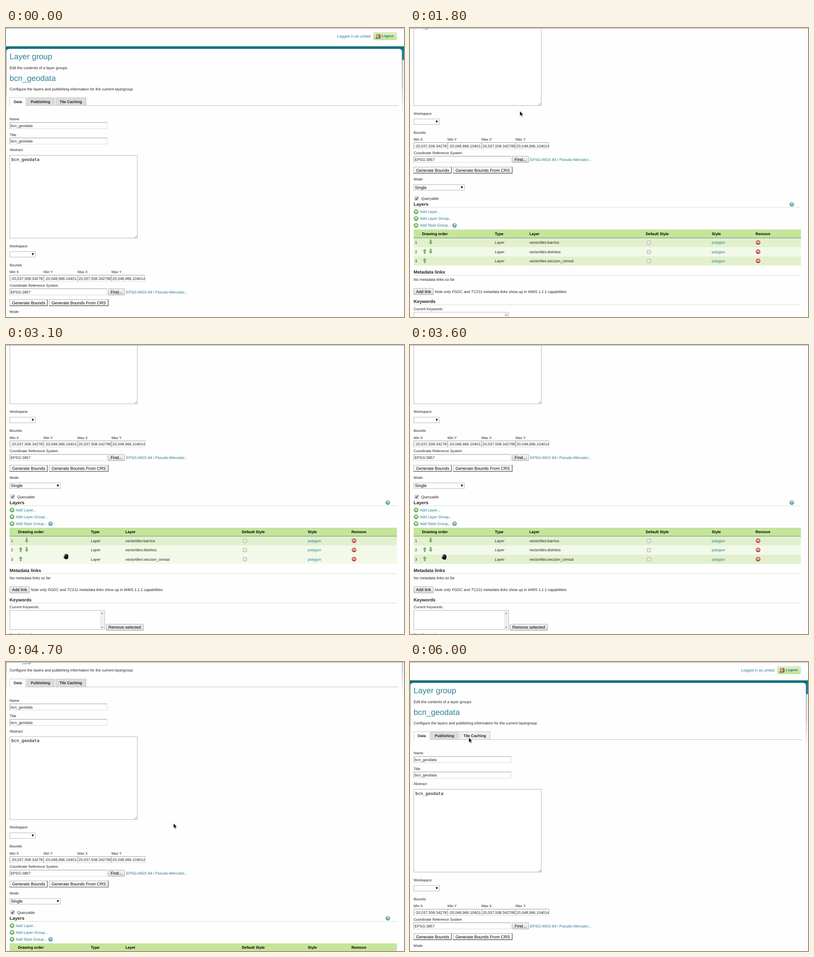
Animation of 877x639 px, one loop 8 s. Source, as an HTML page:

```html
<!DOCTYPE html>
<html lang="en">
<head>
<meta charset="utf-8">
<title>Layer group</title>
<style>
html, body { margin: 0; width: 100%; height: 100%; overflow: hidden; background: #fefefe; }
svg { display: block; }
text { font-family: "Liberation Sans", Arial, sans-serif; text-rendering: geometricPrecision; white-space: pre; }
</style>
</head>
<body>
<svg id="stage" width="877" height="639" viewBox="0 0 877 639">
  <defs>
    <linearGradient id="teal" x2="0" y2="1"><stop stop-color="#0a7896"/><stop offset=".16" stop-color="#08627e"/><stop offset=".2" stop-color="#0a7c9b"/><stop offset="1" stop-color="#1284a2"/></linearGradient>
    <linearGradient id="shade" x2="0" y2="1"><stop stop-color="#666"/><stop offset=".5" stop-color="#888"/><stop offset="1" stop-color="#aaa" stop-opacity="0"/></linearGradient>
    <linearGradient id="btn" x2="0" y2="1"><stop stop-color="#f6f6f6"/><stop offset="1" stop-color="#dadada"/></linearGradient>
    <linearGradient id="lime" x2="0" y2="1"><stop stop-color="#e0f2c4"/><stop offset="1" stop-color="#bfe392"/></linearGradient>
    <linearGradient id="leaf" x2="0" y2="1"><stop stop-color="#8fd07a"/><stop offset="1" stop-color="#3c9a35"/></linearGradient>
    <linearGradient id="rose" x2="0" y2="1"><stop stop-color="#e88a84"/><stop offset="1" stop-color="#c4302c"/></linearGradient>
    <linearGradient id="sky" x2="0" y2="1"><stop stop-color="#9cc4d8"/><stop offset="1" stop-color="#4f8fae"/></linearGradient>
  </defs>
  <g id="page"></g>
  <rect width="877" height="1.4" fill="#b4b4b4"/>
  <g id="cursor"></g>
</svg>
<script>
const $ = id => document.getElementById(id);
const LINK = '#24798c', INK = '#222', SMALL = 7.98, BODY = 8.4, CTRL = 9.33;
const DARK = '#e2f0cd', LIGHT = '#f3f9e9';

const text = (x, y, s, size = BODY, more = '') =>
  `<text x="${x}" y="${y}" font-size="${size}" fill="${INK}" ${more}>${s}</text>`;
const rect = (x, y, w, h, fill, more = '') =>
  `<rect x="${x}" y="${y}" width="${w}" height="${h}" fill="${fill}" ${more}/>`;
const path = (d, more) => `<path d="${d}" ${more}/>`;
const label = (x, y, s) => text(x, y, s, SMALL);
const bold = (x, y, s, size) => text(x, y, s, size, 'font-weight="700"');
const link = (x, y, s) => text(x, y, s, BODY, `style="fill:${LINK}"`);
const frame = (x, y, w, h) => rect(x + .5, y + .5, w - 1, h - 1, '#fff', 'stroke="#aaa" stroke-width=".9"');

function input(x, y, w, s) {
  return rect(x, y, w, 14.5, '#fff') +
    path(`M${x + .4} ${y + 14.5}V${y + .5}H${x + w}`, 'fill="none" stroke="#8c8c8c" stroke-width=".9"') +
    path(`M${x} ${y + 14.1}H${x + w - .4}V${y}`, 'fill="none" stroke="#ccc" stroke-width=".8"') +
    `<svg x="${x}" y="${y}" width="${w - 1.2}" height="14.5">${text(2.2, 10.5, s)}</svg>`;
}
function button(x, y, w, s, outset) {
  const edge = outset
    ? path(`M${x + w - .6} ${y}V${y + 13.9}H${x}`, 'fill="none" stroke="#555" stroke-width="1.2"')
    : '';
  return rect(x + .4, y + .4, w - .8, 13.9, outset ? '#fcfcfc' : 'url(#btn)', `stroke="#999" stroke-width=".8" rx="${outset ? 0 : 1}"`) +
    edge + text(x + 5.4, y + 10.5, s, CTRL, 'style="fill:#000"');
}
function select(x, y, w, s) {
  return frame(x, y, w, 13.2) + text(x + 3, y + 9.8, s, CTRL, 'style="fill:#000"') +
    path(`M${x + w - 8.5} ${y + 4.2}h5l-2.5 5z`, 'fill="#000"');
}
function check(x, y, on) {
  return rect(x + .5, y + .5, 8, 8, '#e9e9e9', 'stroke="#999" stroke-width=".8" rx="1"') +
    (on ? path(`M${x + 2} ${y + 4.6}l2 2.3l3.4-5`, 'fill="none" stroke="#333" stroke-width="1.5"') : '');
}
const disc = (x, y, fill, edge) =>
  `<circle cx="${x}" cy="${y}" r="4.7" fill="${fill}" stroke="${edge}" stroke-width=".7"/>`;
const plus = y => disc(13.4, y, 'url(#leaf)', '#4f9a47') +
  path(`M10.6 ${y}h5.6M13.4 ${y - 2.8}v5.6`, 'stroke="#fff" stroke-width="1.6"');
const minus = y => disc(767, y, 'url(#rose)', '#a83a36') +
  path(`M764 ${y}h6`, 'stroke="#fff" stroke-width="1.7"');
const help = (x, y) => disc(x, y, 'url(#sky)', '#8a9aa4') +
  `<text x="${x}" y="${y + 2.7}" font-size="7.5" font-weight="700" fill="#fff" text-anchor="middle">?</text>`;
const arrow = (x, y, dir) =>
  path(`M${x - 1.2} ${y - 5 * dir}h2.4v${6 * dir}h2.3l-3.5 ${4 * dir}l-3.5 ${-4 * dir}h2.3z`, 'fill="#7cc86a" stroke="#3f8f3a" stroke-width=".7"');
const heading = (y, s) => bold(8, y, s, 10.08) + rect(8, y + 3.2, 853.5, .9, '#d3dfb4');

function tab(x, w, s, id, fill) {
  return `<rect id="${id}" x="${x + .4}" y="153.9" width="${w - .8}" height="17.6" fill="${fill}" stroke="#bbb" stroke-width=".8"/>` +
    bold(x + 9, 165.6, s);
}

function header() {
  let h = rect(0, 39.6, 877, 1.2, '#a9c869') + rect(0, 40.8, 877, 30.2, 'url(#teal)') +
    path('M.8 200V53q0-7 7-7H865.500q7 0 7 7V200z', 'fill="#fefefe"') + rect(0, 71, .9, 127, 'url(#shade)');
  [.75, .4, .2, .1].forEach((o, i) => h += rect(872.3 + i, 53, 1, 146, 'url(#shade)', `opacity="${o}"`));
  h += link(729.5, 20.600, 'Logged in as umbid.') +
    rect(809.5, 9.5, 51.5, 17, 'url(#lime)', 'rx="2.500" stroke="#cfe3b4" stroke-width=".8"') +
    rect(815.5, 13.5, 8, 9.5, '#8a7a6a') + rect(817, 14.500, 4, 7.5, '#d8c49a') +
    path('M821 13l4.500 2v7.500l-4.500 1.500z', 'fill="#a9674a"') + path('M814.500 21h5l2 2.500h-7z', 'fill="#666"') +
    text(828, 20.4, 'Logout', 7.7, `font-weight="700" style="fill:${LINK}"`);
  const title = `style="fill:#2c8298"`;
  return h + text(8, 69.4, 'Layer group', 17.6, title) +
    text(8, 90.6, 'Edit the contents of a layer groups') +
    text(8, 117.2, 'bcn_geodata', 17.6, title) +
    text(8, 137.6, 'Configure the layers and publishing information for the current layergroup') +
    rect(8, 171, 857, .9, '#bbb') +
    tab(8, 35.8, 'Data', 'data', '#fefefe') + rect(8.8, 170.5, 34.2, 1.600, '#fefefe') +
    tab(45.5, 61.5, 'Publishing', 'pub', '#dcdcdc') + tab(109, 68, 'Tile Caching', 'tile', '#dcdcdc');
}

function form() {
  let h = label(8, 204.4, 'Name') + input(8, 208.5, 215, 'bcn_geodata') +
    label(8, 238.6, 'Title') + input(8, 242.6, 215, 'bcn_geodata') +
    label(8, 272.3, 'Abstract') + frame(7.8, 281, 282, 184) +
    text(11.8, 293.8, 'bcn_geodata', CTRL, `style="font-family:'DejaVu Sans Mono',monospace;fill:#000"`) +
    path('M283 464l5.500-5.500M286 464l2.500-2.500', 'stroke="#777" stroke-width=".8"') +
    label(8, 484.9, 'Workspace') + select(7.800, 493.700, 57.2, '') + label(8, 526.9, 'Bounds');
  const bounds = [['Min X', '-20,037,508.342789'], ['Min Y', '-20,048,966.104014'],
    ['Max X', '20,037,508.342789'], ['Max Y', '20,048,966.104014']];
  bounds.forEach(([name, v], i) => h += label(8 + 74.8 * i, 542.4, name) + input(8 + 74.8 * i, 546, 74.6, v));
  return h + label(8, 571.9, 'Coordinate Reference System') + input(8, 576, 215, 'EPSG:3857') +
    button(225, 576, 37.2, 'Find...') + link(264.8, 586.5, 'EPSG:WGS 84 / Pseudo-Mercator...') +
    button(7.8, 600, 84, 'Generate Bounds', true) + button(94.8, 600, 131, 'Generate Bounds From CRS', true) +
    label(8, 630, 'Mode') + select(7.8, 639, 112.5, 'Single') +
    check(10, 665.4, true) + text(24.700, 673, 'Queryable');
}

function layers() {
  let h = heading(686.2, 'Layers') + help(841.3, 683);
  ['Add Layer...', 'Add Layer Group...', 'Add Style Group...'].forEach((s, i) =>
    h += plus(699.2 + 15.1 * i) + link(21.700, 702.2 + 15.1 * i, s));
  h += help(98.2, 729.5) + rect(8, 738.5, 853.500, 18.6, '#c5e59b');
  const heads = { 26.5: 'Drawing order', 187: 'Type', 263: 'Layer', 519.5: 'Default Style', 665: 'Style', 761.3: 'Remove' };
  for (const x in heads) h += text(x, 750.6, heads[x], BODY, 'font-weight="700" style="fill:#000"');
  ['barrios', 'distritos', 'seccion_censal'].forEach((s, i) => {
    const y = 757.5 + 20.3 * i, mid = y + 9.8, base = y + 12.9;
    h += `<rect id="row${i}" x="8" y="${y}" width="853.5" height="20.3"/>` +
      text(11, base, i + 1) + text(187, base, 'Layer', BODY, 'font-style="italic"') +
      text(263, base, 'vectortiles:' + s) + check(522, mid - 4.2) + link(665, base, 'polygon') + minus(mid);
    if (i > 0) h += arrow(32.4, mid - .8, -1);
    if (i < 2) h += arrow(45.6, mid - 1, 1);
  });
  return h + rect(8, 756.7, 853.5, 1, '#4d8d8a');
}

function footer() {
  return heading(836.2, 'Metadata links') + text(8, 852.2, 'No metadata links so far') +
    button(7.8, 868.4, 44, 'Add link') +
    text(54.5, 878.7, 'Note only FGDC and TC211 metadata links show up in WMS 1.1.1 capabilities', BODY, 'font-style="italic"') +
    heading(901.4, 'Keywords') + label(8, 916.8, 'Current Keywords') +
    frame(7.8, 920.8, 210, 43.4) + rect(207, 921.7, 10, 41.6, '#efefef') +
    path('M209.500 929h5l-2.500-3.200zM209.500 957.500h5l-2.500 3.200z', 'fill="#999"') +
    button(220, 951.4, 83.6, 'Remove selected') + label(8, 977, 'New Keyword');
}

const ARROW = path('M0 0V11.300L2.700 8.800L4.500 12.800L6.400 12L4.600 8.100H7.900Z', 'fill="#111" stroke="#fff" stroke-width=".7"');
const outlined = d => path(d, 'fill="none" stroke="#fff" stroke-width="3.2" stroke-linecap="round" stroke-linejoin="round"') +
  path(d, 'fill="#111" stroke="#111" stroke-width="1.900" stroke-linecap="round" stroke-linejoin="round"');
const GRAB = outlined('M-2.600 0L-3-3.500M-.3-1V-5M1.800-1L2-4.500M3.800 0V-3M-2.600 0H3.800V2.500L2.500 5H-2L-5 1.500L-2.600 2Z');
const POINT = outlined('M.5 1V8M.5 7H6.500Q8 7.500 8 9L7 13H1.200L-1.800 8.500L.5 9Z');

// Keys: time, then values; the picture advances every 100 ms.
const SCROLL = [[1200, 0], [1300, 1], [1400, 25], [1800, 293], [1900, 328], [2100, 328], [2200, 334.5],
  [4400, 334.5], [4500, 333], [4600, 333], [4700, 116.4], [4800, 46], [4900, 12], [5000, 0]];
const MOVE = [[600, 586, 73], [700, 465, 117], [900, 242, 183.5], [2300, 242, 183.5], [2700, 180, 431], [2800, 180, 431],
  [3000, 150, 456], [3100, 132.5, 467.5], [3200, 6.5, 480], [3300, 16, 486], [3400, 16, 486], [3600, 75.5, 468.5],
  [3800, 130, 424], [4000, 130, 424], [4500, 369, 356.5], [5100, 369, 356.5], [5600, 138, 159], [5800, 129.5, 167]];
const HOVER = [[2700, 0], [2900, 1], [3100, 2], [3300, -1], [3800, 0], [4100, -1]];

function at(keys, t) {
  const i = keys.findIndex(k => k[0] > t);
  if (i < 0) return keys[keys.length - 1].slice(1);
  if (!i) return keys[0].slice(1);
  const a = keys[i - 1], b = keys[i], p = (t - a[0]) / (b[0] - a[0]);
  return a.slice(1).map((v, j) => v + (b[j + 1] - v) * p);
}

$('page').innerHTML = header() + form() + layers() + footer();
let shape;

function draw(ms) {
  const t = Math.floor(ms / 100) * 100;
  $('page').setAttribute('transform', `translate(0 ${-at(SCROLL, t)[0]})`);
  const [x, y] = at(MOVE, t), cursor = $('cursor');
  const next = t >= 2700 && t < 4100 ? GRAB : t >= 5800 && t < 6000 ? POINT : ARROW;
  if (next !== shape) cursor.innerHTML = shape = next;
  cursor.setAttribute('transform', `translate(${x} ${y})`);
  cursor.setAttribute('visibility', t < 600 ? 'hidden' : 'visible');
  const over = HOVER.reduce((r, [from, row]) => t >= from ? row : r, -1);
  for (let i = 0; i < 3; i++) $('row' + i).setAttribute('fill', i === 1 || i === over ? LIGHT : DARK);
  $('tile').setAttribute('fill', t > 5000 && y < 171 && x < 177 ? '#eee' : '#dcdcdc');
}

const start = performance.now();
function tick() {
  draw((performance.now() - start) % 8000);
  requestAnimationFrame(tick);
}
tick();
</script>
</body>
</html>
```
